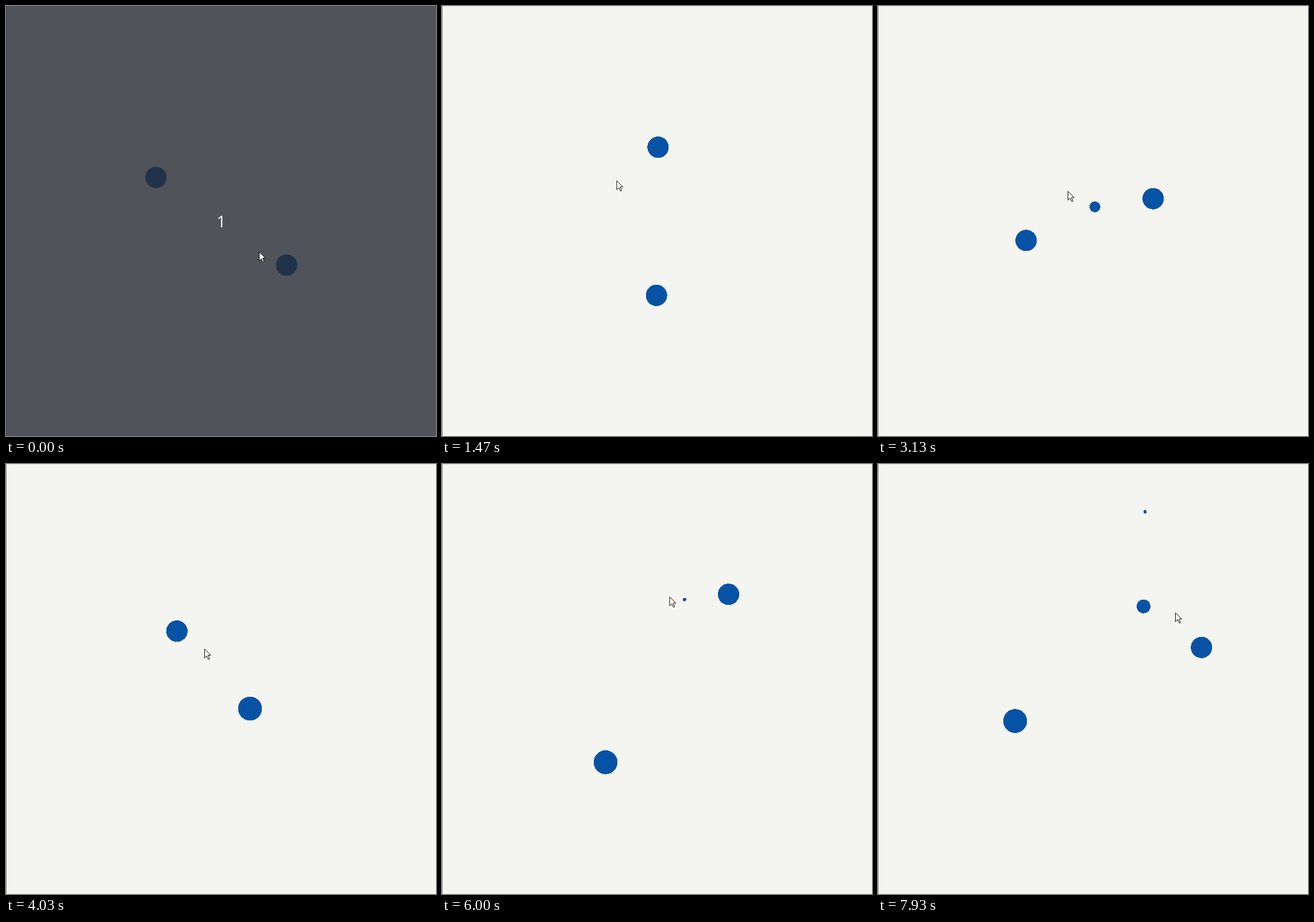
An HTML page that plays this animation: 748x748 px, repeating every 8000 ms.

```html
<!DOCTYPE html>
<html lang="en">
<head>
<meta charset="utf-8">
<title>Orbits</title>
<style>
  html, body { margin: 0; width: 100%; height: 100%; overflow: hidden; background: #f4f5f0; }
  svg { display: block; width: 100vw; height: 100vh; }
  circle { shape-rendering: crispEdges; }
  .planet { fill: #0653a5; }
  .held { fill: #000; }
  #count { font: 28px "Open Sans", "Noto Sans", sans-serif; fill: #fff; text-anchor: middle; }
</style>
</head>
<body>
<svg viewBox="0 0 748 748">
  <rect width="748" height="748" fill="#f4f5f0"/>
  <rect width="748" height="1" fill="#e4e5e1"/>
  <rect width="1" height="748" fill="#858585"/>
  <line id="aim" stroke="#000"/>
  <g id="planets"></g>
  <g id="overlay">
    <rect width="748" height="748" fill="#272b35" fill-opacity=".8"/>
    <text id="count" x="374.5" y="385">1</text>
  </g>
  <path id="cursor" d="M.5 .8V16.4L4.2 12.8L6.8 18.4H8.8V17L6.6 11.6H11.2Z" fill="#fff" stroke="#000"/>
</svg>
<script>
// Times are in seconds, speeds in pixels per second.
const LOOP = 8, LAST = 7.93, COUNT_END = .33, MERGE = 3.5;
const CENTER = 374.5, RADIUS = 18.6, MERGED_RADIUS = 20.8, DOT = 3;
const $ = id => document.getElementById(id);

// Undisturbed, both planets circle the centre on opposite sides: [time, degrees, distance].
const opening = phase => [0, .8, 1.6, 2.4].map(t =>
  [t, phase + 36.6 * t + 1.35 * t * t, 136.8 - 6.9 * t + t * t]);

const heavy = [...opening(213.9),
  [3, 332, 116], [4.03, 405.6, 71.4], [5.13, 464, 134.5],
  [5.83, 478.9, 165], [6.87, 494.9, 181.2], [7.93, 511.9, 154.1]];
const light = [...opening(33.9),
  [3, 156.5, 122.7], [4.03, 227.3, 113.9], [5.13, 284.6, 157.9],
  [6.87, 325.9, 212.9], [7.93, 343.6, 196.3]];

// A throw: press and grow, drag to aim, release; then it flies under a steady pull.
const throws = [
  { press: 1.65, drag: 2.05, launch: 2.23, end: MERGE, size: 9.4,
    at: [285, 301], aim: [315, 322], speed: [36, 20], pull: [148, 75] },
  { press: 4.9, drag: 4.98, launch: 5.48, end: LOOP, size: DOT,
    at: [448, 321.5], aim: [383, 197], speed: [-65.4, -183.3], pull: [58.9, 70.2] },
  { press: 6.3, drag: 6.8, launch: 7.4, end: LOOP, size: 12,
    at: [401, 245], aim: [517, 258], speed: [115, 5], pull: [0, 0] }
];

const wander = [[0, 440, 427], [.67, 720, 335], [.85, 428, 318],
  [4.03, 345, 321], [5.13, 386.5, 280.5], [6.87, 400.5, 249]];
const pointer = throws
  .flatMap(({ press, drag, launch, at, aim }) => [[press, ...at], [drag, ...at], [launch, ...aim]])
  .concat(wander)
  .sort((a, b) => a[0] - b[0]);

function segment(keys, t) {
  let i = 0;
  while (i < keys.length - 2 && t >= keys[i + 1][0]) i++;
  const [a, b] = [keys[i], keys[i + 1]], span = b[0] - a[0];
  return { i, a, b, span, u: Math.min(1, (t - a[0]) / span) };
}

function slope(keys, i, axis) {
  const rate = k => (keys[k + 1][axis] - keys[k][axis]) / (keys[k + 1][0] - keys[k][0]);
  if (i === 0) return rate(0);
  if (i === keys.length - 1) return rate(i - 1);
  const before = keys[i][0] - keys[i - 1][0], after = keys[i + 1][0] - keys[i][0];
  return (rate(i - 1) * after + rate(i) * before) / (before + after);
}

function orbit(keys, t) {
  const { i, a, b, span, u } = segment(keys, t), v = 1 - u;
  const [angle, distance] = [1, 2].map(axis =>
    v * v * (1 + 2 * u) * a[axis] + u * u * (3 - 2 * u) * b[axis]
    + span * u * v * (v * slope(keys, i, axis) - u * slope(keys, i + 1, axis)));
  const rad = angle * Math.PI / 180;
  return [CENTER + distance * Math.cos(rad), CENTER + distance * Math.sin(rad)];
}

function flight({ launch, at, speed, pull }, t) {
  const s = Math.max(0, t - launch);
  return at.map((start, k) => start + speed[k] * s + pull[k] * s * s / 2);
}

function glide(keys, t) {
  const { a, b, u } = segment(keys, t), e = u * u * (3 - 2 * u);
  return [1, 2].map(axis => a[axis] + (b[axis] - a[axis]) * e);
}

const set = (node, attrs) => {
  for (const name in attrs) node.setAttribute(name, attrs[name]);
};
const show = (node, on) => set(node, { visibility: on ? "visible" : "hidden" });

function planet() {
  const node = document.createElementNS("http://www.w3.org/2000/svg", "circle");
  set(node, { class: "planet" });
  return $("planets").appendChild(node);
}
const place = (node, [cx, cy], r) => set(node, { cx, cy, r });

const heavyNode = planet(), lightNode = planet();
for (const ball of throws) ball.node = planet();

function draw(time) {
  const t = Math.min(time % LOOP, LAST);
  const [x2, y2] = glide(pointer, t);
  place(heavyNode, orbit(heavy, t), t < MERGE ? RADIUS : MERGED_RADIUS);
  place(lightNode, orbit(light, t), RADIUS);

  show($("aim"), false);
  for (const ball of throws) {
    const { node, press, drag, launch, end, size, at: [x1, y1] } = ball;
    const visible = t >= press && t < end, held = visible && t < launch;
    const growth = Math.min(1, Math.max(0, (t - press) / (drag - press)));
    place(node, flight(ball, t), DOT + (size - DOT) * growth);
    set(node, { class: held ? "held" : "planet" });
    show(node, visible);
    if (held) {
      set($("aim"), { x1, y1, x2, y2 });
      show($("aim"), true);
    }
  }
  show($("overlay"), t < COUNT_END);
  set($("cursor"), { transform: `translate(${x2} ${y2})` });
}

let start;
function tick(now) {
  start ??= now;
  draw((now - start) / 1000);
  requestAnimationFrame(tick);
}
draw(0);
requestAnimationFrame(tick);
</script>
</body>
</html>
```
